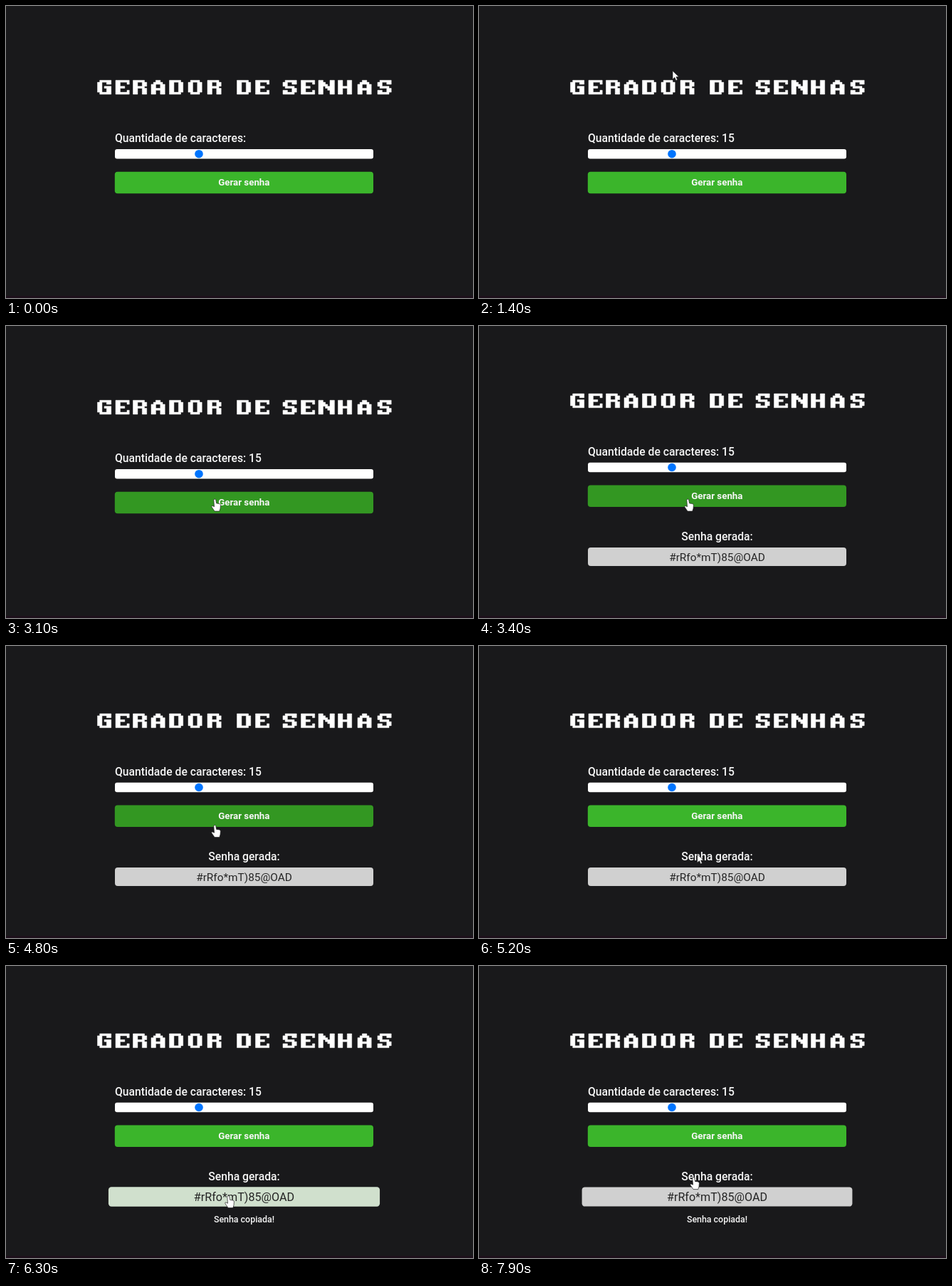
These frames come from a looping animation (656x410 px, 8000 ms). An HTML page:

```html
<!DOCTYPE html>
<html lang="pt-BR">
<head>
<meta charset="utf-8">
<title>Gerador de senhas</title>
<style>
  html, body { margin: 0; width: 100%; height: 100%; overflow: hidden; background: #19191b; }
  svg { display: block; width: 100%; height: 100%; }
  text { font-family: Roboto, "Open Sans", sans-serif; font-size: 15.7px; font-weight: 500; fill: #f6f6f6; }
  .mid { text-anchor: middle; }
  .bold { font-size: 13.3px; font-weight: 700; }
  .small { font-size: 12.4px; }
  .pass { font-size: 15.4px; font-weight: 400; fill: #252525; }
  .title path { fill: #fff; fill-rule: evenodd; stroke: #fff; stroke-width: .5; vector-effect: non-scaling-stroke; }
  .cursor path { fill: #fff; stroke: #222; stroke-width: .7; stroke-linejoin: round; }
</style>
</head>
<body>
<svg viewBox="0 0 656 410">
  <rect width="656" height="410" fill="#19191b"/>
  <rect y="407" width="656" height="3" fill="#1d101b"/>
  <g id="form">
    <g id="title" class="title"></g>
    <text x="153" y="190.9">Quantidade de caracteres:</text>
    <text id="count" x="341" y="190.9">15</text>
    <rect x="153" y="201" width="363" height="13.5" rx="3" fill="#fff"/>
    <circle cx="271" cy="207.7" r="5.8" fill="#0075ff"/>
    <rect id="button" x="152.8" y="232.7" width="363.2" height="30.6" rx="4"/>
    <text class="mid bold" x="334.3" y="252">Gerar senha</text>
  </g>
  <g id="result">
    <text class="mid" x="334.5" y="301.2">Senha gerada:</text>
    <g id="box">
      <rect id="field" x="153" y="311" width="363" height="26" rx="4"/>
      <text class="mid pass" x="334.5" y="329.6">#rRfo*mT)85@OAD</text>
    </g>
    <text id="hint" class="mid small" x="334.5" y="360.3"></text>
  </g>
  <g id="cursor" class="cursor">
    <path id="arrow" d="M0 0V12L2.8 9.3 4.7 13.6 6.8 12.7 5 8.6H8.8Z"/>
    <path id="hand" d="M-2.2 2a1.5 1.5 0 0 1 2.9-.5L1.6 6.4 5.8 7q1.6.4 1.6 2l-.4 4.8-1.2 3.8H-1L-5 11.7q-.8-1.9.9-1.8l2.6 1.3Z"/>
  </g>
</svg>
<script>
const $ = id => document.getElementById(id);
const LOOP = 8000, STEP = 100;

// Title letters on a grid of 7 rows
const glyphs = {
  G: 'M1 0h5v2h-2v-1h-2v5h2v-2h-1v-1h3v4h-5v-1h-1v-5h1z',
  E: 'M0 0h6v2h-1v-1h-3v2h2v1h-2v2h3v-1h1v2h-6z',
  R: 'M0 0h5v1h1v2h-1v1h1v3h-2v-3h-2v3h-2zM2 1v2h2v-2z',
  A: 'M2 0h2v1h1v1h1v5h-2v-2h-2v2h-2v-5h1v-1h1zM2 2v2h2v-2z',
  D: 'M0 0h5v1h1v5h-1v1h-5zM2 1v5h2v-5z',
  O: 'M1 0h4v1h1v5h-1v1h-4v-1h-1v-5h1zM2 1v5h2v-5z',
  S: 'M1 0h5v2h-2v-1h-2v2h3v1h1v2h-1v1h-5v-2h2v1h2v-2h-3v-1h-1v-2h1z',
  N: 'M0 0h2v1h1v1h1v1h1v-3h2v7h-2v-2h-1v-1h-1v-1h-1v4h-2z',
  H: 'M0 0h2v3h2v-3h2v7h-2v-3h-2v3h-2z'
};
const words = [
  ['GERADOR', [128.5, 154, 178.5, 204, 229.5, 256, 283]],
  ['DE', [324.5, 350.5]],
  ['SENHAS', [389, 414.5, 439, 466.5, 494, 522]]
];
$('title').innerHTML = words.map(([word, xs]) => xs.map((x, i) =>
  `<path transform="translate(${x} 104.3) scale(3.2 2.8)" d="${glyphs[word[i]]}"/>`
).join('')).join('');

// Pointer: time, x, y of its tip
const path = [
  [500, 398, 0], [1300, 265, 73], [1400, 272, 91], [1900, 343, 168],
  [2200, 325, 232], [2500, 294, 242.5], [4700, 294, 242.5], [4800, 294, 251],
  [5400, 313, 313], [5500, 313, 315], [5700, 313, 322], [7700, 313, 322],
  [7800, 310, 314], [7900, 302, 296]
];

function pointer(t) {
  const i = path.findIndex(k => k[0] > t);
  if (i < 0) return path[path.length - 1].slice(1);
  if (i === 0) return path[0].slice(1);
  const [t0, x0, y0] = path[i - 1], [t1, x1, y1] = path[i];
  const p = (t - t0) / (t1 - t0);
  return [x0 + (x1 - x0) * p, y0 + (y1 - y0) * p];
}

const within = (t, a, b) => t >= a && t < b;
const show = (id, on) => $(id).setAttribute('visibility', on ? 'visible' : 'hidden');
const easeOut = p => 1 - (1 - Math.min(1, Math.max(0, p))) ** 2;

function draw(t) {
  const onButton = within(t, 2300, 4900);
  const onField = within(t, 5400, 7900);
  const onHand = onButton || t >= 5400;

  $('form').setAttribute('transform', `translate(0 ${t >= 3400 ? -9.2 : 0})`);
  $('count').textContent = t >= 100 ? '15' : '';
  $('button').setAttribute('fill', onButton ? '#339722' : '#3bb52b');

  $('result').style.display = t >= 3400 ? '' : 'none';
  const scale = 1 + 0.05 * (easeOut((t - 5400) / 400) - easeOut((t - 7885) / 400));
  $('box').setAttribute('transform',
    `translate(334.5 324) scale(${scale}) translate(-334.5 -324)`);
  $('field').setAttribute('fill', onField ? '#d0e0cd' : '#d0d0d0');
  $('hint').textContent = t < 5400 ? '' : t < 6000
    ? 'Clique na senha para copiar para área de transferência'
    : 'Senha copiada!';

  const [x, y] = pointer(t);
  $('cursor').setAttribute('transform', `translate(${x} ${y})`);
  show('arrow', t >= 500 && !onHand);
  show('hand', onHand);
}

const start = performance.now();
function tick() {
  const t = (performance.now() - start) % LOOP;
  draw(Math.floor(t / STEP) * STEP);
  requestAnimationFrame(tick);
}
tick();
</script>
</body>
</html>
```
